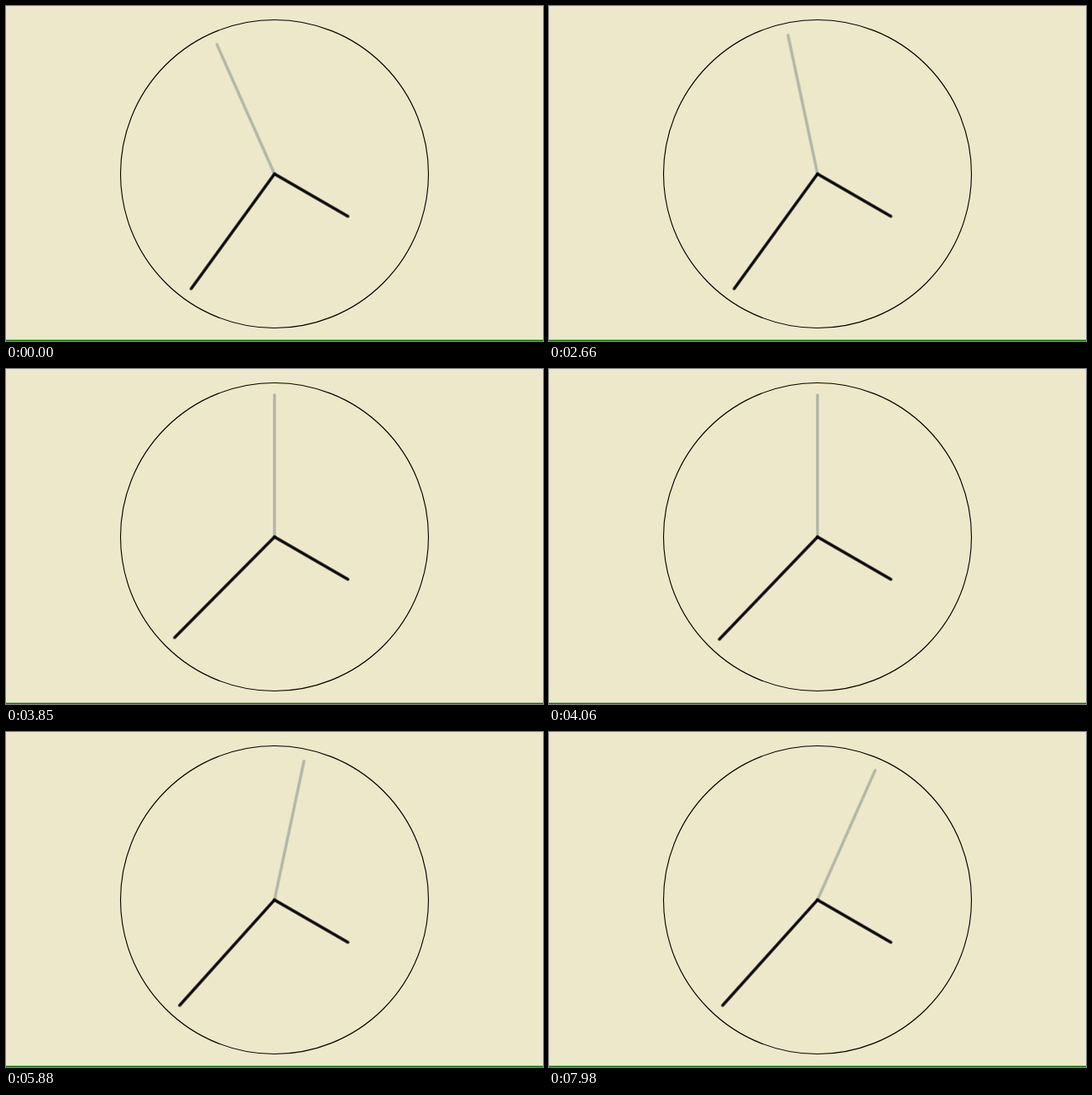
These frames come from a looping animation (640 px wide and 399 px high, 8000 ms). An HTML page:

```html
<!DOCTYPE html>
<html lang="en">
<head>
<meta charset="utf-8">
<title>Clock</title>
<style>
  html, body { margin: 0; width: 100%; height: 100%; overflow: hidden; background: #eee8ca; }
  svg { display: block; width: 100vw; height: 100vh; }
  .face { fill: none; stroke: #000; stroke-width: 1.1; }
  .hand { stroke: #000; stroke-width: 3.4; stroke-linecap: round; }
  .second, .minute { animation: 8s step-end -3ms infinite; }
  .second { stroke: #b0b6a6; animation-name: tick; }
  .minute { animation-name: spring; }
  .hour { transform: rotate(120deg); }

  @keyframes tick {
    0% { transform: rotate(-24deg); }
    7.875% { transform: rotate(-18deg); }
    21% { transform: rotate(-12deg); }
    34.125% { transform: rotate(-6deg); }
    47.25% { transform: rotate(0deg); }
    60.375% { transform: rotate(6deg); }
    73.5% { transform: rotate(12deg); }
    86.625% { transform: rotate(18deg); }
    99.75%, 100% { transform: rotate(24deg); }
  }

  /* cubic-bezier(.1, 2.7, .58, 1) shown every 70 ms */
  @keyframes spring {
    0% { transform: rotate(216deg); }
    47.25% { transform: rotate(221.9deg); }
    48.125% { transform: rotate(224.8deg); }
    49% { transform: rotate(225.2deg); }
    49.875% { transform: rotate(224.7deg); }
    50.75% { transform: rotate(223.8deg); }
    51.625% { transform: rotate(222.9deg); }
    52.5% { transform: rotate(222.3deg); }
    53.375%, 100% { transform: rotate(222deg); }
  }
</style>
</head>
<body>
<svg viewBox="0 0 640 399">
  <rect y="397.6" width="640" height="1.4" fill="#007400"/>
  <g transform="translate(320 200)">
    <circle class="face" r="183.5"/>
    <line class="hand second" y2="-169"/>
    <line class="hand minute" y2="-169"/>
    <line class="hand hour" y2="-101"/>
  </g>
</svg>
</body>
</html>
```
